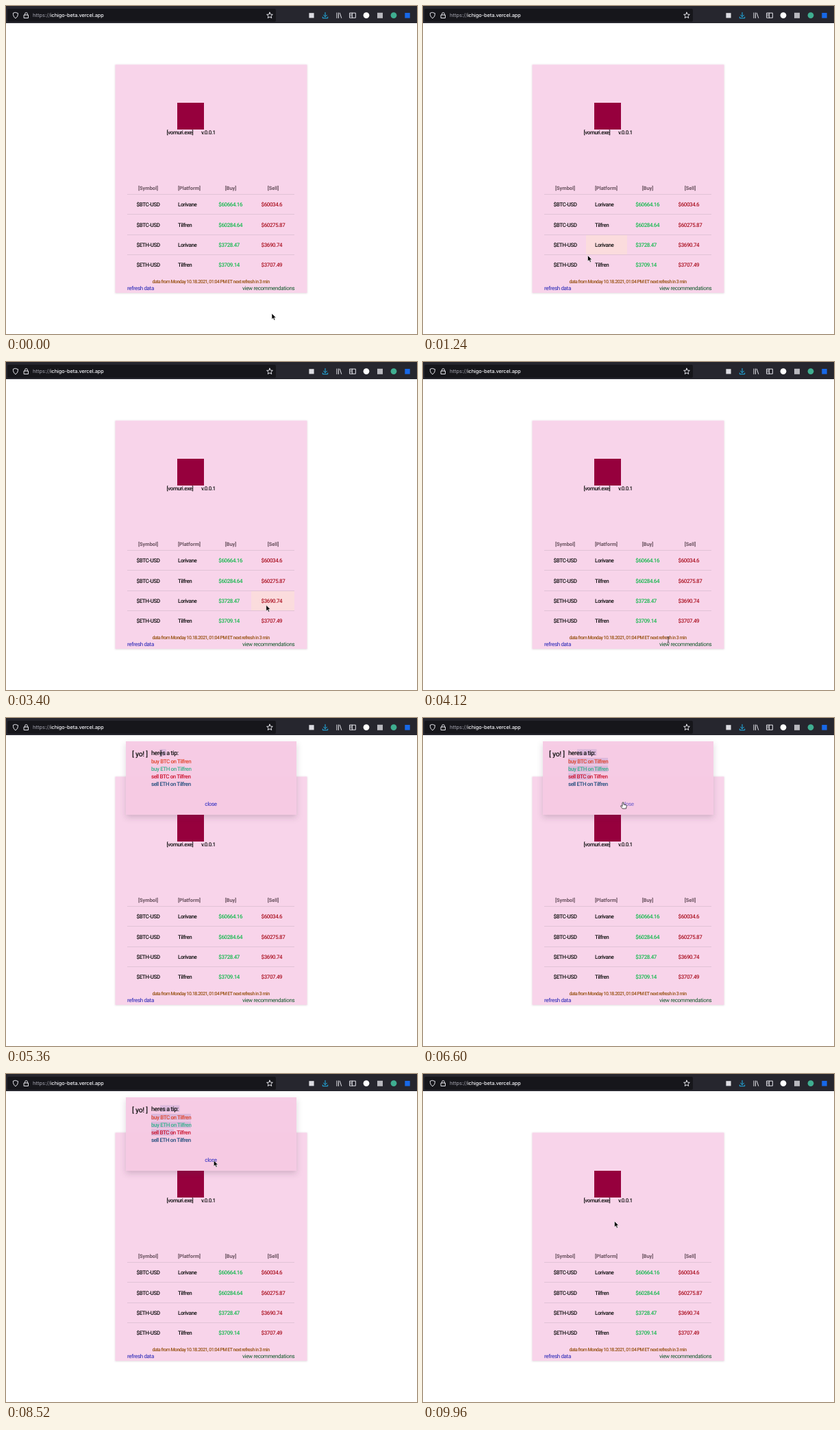
An HTML page for the animation above (10 s loop, 600x478 px).

```html
<!DOCTYPE html>
<html lang="en">
<head>
<meta charset="utf-8">
<title>Price board</title>
<style>
  html, body { margin: 0; width: 100%; height: 100%; overflow: hidden; background: #fff; }
  svg { display: block; width: 600px; height: 478px; }
  text { font: 500 8px Roboto, "Liberation Sans", sans-serif; letter-spacing: -.42px; text-rendering: geometricPrecision; white-space: pre; }
  .url { font: 500 7.4px Inter, Roboto, sans-serif; letter-spacing: 0; }
  .host { letter-spacing: -.09px; }
  .head { font-size: 7.4px; font-weight: 700; letter-spacing: 0; text-anchor: middle; }
  .status { font-size: 7px; letter-spacing: -.53px; }
  .link { font-weight: 400; letter-spacing: -.33px; }
  .tip { font-size: 9px; letter-spacing: -.39px; }
  .yo { font-size: 10.5px; letter-spacing: -.3px; }
  .icon { fill: none; stroke: #e4e4ea; stroke-width: 1; stroke-linecap: round; stroke-linejoin: round; }
</style>
</head>
<body>
<svg viewBox="0 0 600 478">
  <defs>
    <filter id="cardShadow" x="-10%" y="-10%" width="120%" height="120%">
      <feDropShadow dx="0" dy=".5" stdDeviation=".8" flood-color="#604058" flood-opacity=".25"/>
    </filter>
    <filter id="modalShadow" x="-10%" y="-20%" width="120%" height="150%">
      <feDropShadow dx="0" dy="4" stdDeviation="4" flood-color="#503048" flood-opacity=".22"/>
    </filter>
  </defs>
  <rect width="600" height="478" fill="#fff"/>

  <g id="toolbar">
    <rect width="600" height="25" fill="#26262e"/>
    <rect x="2" y="4" width="392" height="19" rx="2" fill="#16161b"/>
    <g class="icon">
      <path d="M14 9.5 L17.6 10.7 Q17.8 15.7 14 18 Q10.2 15.7 10.4 10.7Z"/>
      <path d="M26.5 13h6v4.5h-6z M27.7 13v-1.6a1.8 1.8 0 0 1 3.6 0V13"/>
      <path id="star"/>
      <path d="M483 10v7.5 M485.5 10v7.5 M487.3 10.2l2.4 7.2"/>
      <path d="M502 10.2h8.4v7h-8.4z M505.4 10.2v7 M503 12.3h1.2 M503 14.3h1.2"/>
    </g>
    <path class="icon" style="stroke:#20b4ec" d="M466 9.5v6 M463.5 13.2l2.5 2.5 2.5-2.5 M462.3 16v1.7h7.4V16"/>
    <rect x="442.4" y="10.2" width="7.2" height="7.2" fill="#dcdce2"/>
    <circle cx="526" cy="13.6" r="4.4" fill="#fff"/>
    <rect x="542" y="9.8" width="8" height="8" fill="#b8b8be"/>
    <circle cx="566" cy="13.6" r="4.4" fill="#3fae91"/>
    <rect x="582.3" y="10" width="7.4" height="7.6" fill="#1768e8"/>
    <text class="url" x="39" y="16.3" fill="#92929c">https://<tspan class="host" fill="#f4f4f8">ichigo-beta.vercel.app</tspan></text>
  </g>

  <rect x="159.5" y="85.5" width="280" height="332.5" fill="#f8d4ea" filter="url(#cardShadow)"/>
  <rect x="250" y="141" width="39" height="39" fill="#96003d"/>
  <text x="234.5" y="187" fill="#111">[vomuri.exe]</text>
  <text x="285" y="187" fill="#111">v.0.0.1</text>

  <rect id="hover" width="61" height="28.6" fill="#fbdcdd"/>
  <g id="table"></g>
  <text class="status" x="213.5" y="403.5" fill="#96500f">data from Monday 10.18.2021, 01:04 PM ET next refresh in 3 min</text>
  <text class="link" id="refresh" x="177" y="413.5" fill="#2020b4">refresh data</text>
  <text class="link" id="view" x="345" y="413.5" fill="#125a2c">view recommendations</text>

  <g id="modal">
    <rect x="175" y="34" width="249" height="107" fill="#f7cae4" fill-opacity=".96" filter="url(#modalShadow)"/>
    <g id="selection" fill="#dcb9dc"></g>
    <text class="yo" x="184" y="56.2" fill="#111">[ yo! ]</text>
    <text class="tip" x="212" y="53.5" fill="#111">heres a tip:</text>
    <g id="tips"></g>
    <text class="link" id="close" x="290.3" y="128.4" fill="#2424c0">close</text>
  </g>

  <g id="cursor">
    <path id="arrow" d="M0 0V8.6L2 6.8 3.4 9.9 4.9 9.2 3.5 6.2H6.2Z" fill="#000" stroke="#fff" stroke-width=".6"/>
    <path id="beam" d="M-1.5-4Q0-4 0-3Q0-4 1.5-4 M0-3V3.4 M-1.5 4.4Q0 4.4 0 3.4Q0 4.4 1.5 4.4" fill="none" stroke="#222" stroke-width=".8"/>
    <path id="hand" d="M-1 .4Q0-.7 1 .4V3.2L4.4 3.8Q5.4 4 5.2 5.2L4.5 9H-.8L-3.5 5.6Q-3.4 4.3-2.2 4.9L-1 5.8Z" fill="#fff" stroke="#222" stroke-width=".8"/>
  </g>
</svg>

<script>
const LOOP = 10000, FRAME = 40;
const MODAL_OPEN = 4760, MODAL_CLOSE = 8800;
const SELECT_START = 5320, SELECT_END = 5840;
const ROW_TOP = 275, ROW_HEIGHT = 29.4;
const columnEdges = [177, 238, 298, 358, 421];
const $ = id => document.getElementById(id);
const clamp01 = v => Math.max(0, Math.min(1, v));

function add(parent, tag, attrs, content = "") {
  const el = document.createElementNS("http://www.w3.org/2000/svg", tag);
  for (const key in attrs) el.setAttribute(key, attrs[key]);
  el.textContent = content;
  parent.append(el);
  return el;
}

$("star").setAttribute("d", "M" + Array.from({ length: 10 }, (_, i) => {
  const r = i % 2 ? 2.1 : 4.6, a = i * Math.PI / 5;
  return `${385 + r * Math.sin(a)} ${13.8 - r * Math.cos(a)}`;
}).join("L") + "Z");

const headings = [["[Symbol]", 207.5], ["[Platform]", 267.5], ["[Buy]", 328], ["[Sell]", 390]];
const rows = [
  ["$BTC-USD", "Lorivane", "$60664.16", "$60034.6"],
  ["$BTC-USD", "Tilfren", "$60284.64", "$60275.87"],
  ["$ETH-USD", "Lorivane", "$3728.47", "$3690.74"],
  ["$ETH-USD", "Tilfren", "$3709.14", "$3707.49"]
];
const textX = [190.5, 251, 310.3, 372.5];
const cellColors = ["#111", "#111", "#16b94f", "#ac1424"];

headings.forEach(([label, x]) => add($("table"), "text", { class: "head", x, y: 268, fill: "#69525f" }, label));
rows.forEach((row, r) => {
  const top = ROW_TOP + r * ROW_HEIGHT;
  add($("table"), "path", { d: `M177 ${Math.round(top) - .5}H421`, stroke: "#dfc1d5", "stroke-width": .9 });
  row.forEach((value, c) =>
    add($("table"), "text", { x: textX[c], y: top + 17.1, fill: cellColors[c] }, value));
});

[["buy BTC", "#e0452b"], ["buy ETH", "#35b38c"], ["sell BTC", "#cc1530"], ["sell ETH", "#1f4c7c"]]
  .forEach(([action, fill], i) =>
    add($("tips"), "text", { x: 212, y: 65.5 + i * 11.1, fill }, action + " on Tilfren"));

// Selected text lines: left, top, full width.
const selection = [[225, 45.5, 28.5], [212, 58, 58], [212, 69.2, 58], [212, 80.3, 33]]
  .map(([x, y, width]) => ({ width, el: add($("selection"), "rect", { x, y, height: 9.5 }) }));

// Pointer path: time, x, y.
const path = [
  [0, 388, 448], [40, 388, 447], [200, 388, 447], [700, 326, 402], [1240, 240.5, 363.5],
  [1700, 268, 322], [2200, 342, 300], [2680, 395.3, 294.5], [3240, 390, 345], [3760, 345, 386],
  [4120, 358, 404.5], [4360, 374, 410], [4800, 378, 410], [5280, 226, 51], [5340, 226, 51],
  [5840, 245, 86], [6400, 292, 123], [6600, 292, 123], [7300, 298, 125], [8000, 304, 126],
  [8840, 303, 126], [9500, 288, 190], [9960, 279.5, 214.5], [10000, 279.5, 214.5]
];

function pointerAt(t) {
  const i = path.findIndex(p => p[0] > t);
  const [t0, x0, y0] = path[i - 1], [t1, x1, y1] = path[i];
  const u = (t - t0) / (t1 - t0), k = u * u * (3 - 2 * u);
  return [x0 + (x1 - x0) * k, y0 + (y1 - y0) * k];
}

const inside = (x, y, l, t, r, b) => x >= l && x <= r && y >= t && y <= b;
const show = (id, on) => $(id).setAttribute("visibility", on ? "visible" : "hidden");

function render(t) {
  const [x, y] = pointerAt(t);
  const open = t >= MODAL_OPEN && t < MODAL_CLOSE;
  $("modal").style.display = open ? "" : "none";

  const progress = clamp01((t - SELECT_START) / (SELECT_END - SELECT_START));
  selection.forEach(({ el, width }, i) =>
    el.setAttribute("width", width * clamp01(progress * selection.length - i)));

  const column = columnEdges.findIndex((left, i) => x >= left && x < columnEdges[i + 1]);
  const row = Math.floor((y - ROW_TOP - 2) / ROW_HEIGHT);
  const onCell = column >= 0 && row >= 0 && row < rows.length;
  show("hover", onCell);
  if (onCell) {
    $("hover").setAttribute("x", columnEdges[column]);
    $("hover").setAttribute("y", Math.round(ROW_TOP + row * ROW_HEIGHT));
    $("hover").setAttribute("width", columnEdges[column + 1] - columnEdges[column]);
  }

  const onView = inside(x, y, 345, 407, 421, 417);
  const onClose = open && t < 7800 && inside(x, y, 289, 121, 309, 131);
  const onText = inside(x, y, 213, 397, 385, 406) || (open && inside(x, y, 212, 45, 271, 101));
  $("view").setAttribute("opacity", onView ? .65 : 1);
  $("close").setAttribute("opacity", onClose ? .65 : 1);
  const kind = onView || onClose ? "hand" : onText ? "beam" : "arrow";
  ["arrow", "beam", "hand"].forEach(id => show(id, id === kind));
  $("cursor").setAttribute("transform", `translate(${x.toFixed(1)} ${y.toFixed(1)})`);
}

const start = performance.now();
function tick() {
  const t = (performance.now() - start) % LOOP;
  render(Math.floor(t / FRAME) * FRAME);
  requestAnimationFrame(tick);
}
render(0);
requestAnimationFrame(tick);
</script>
</body>
</html>
```
